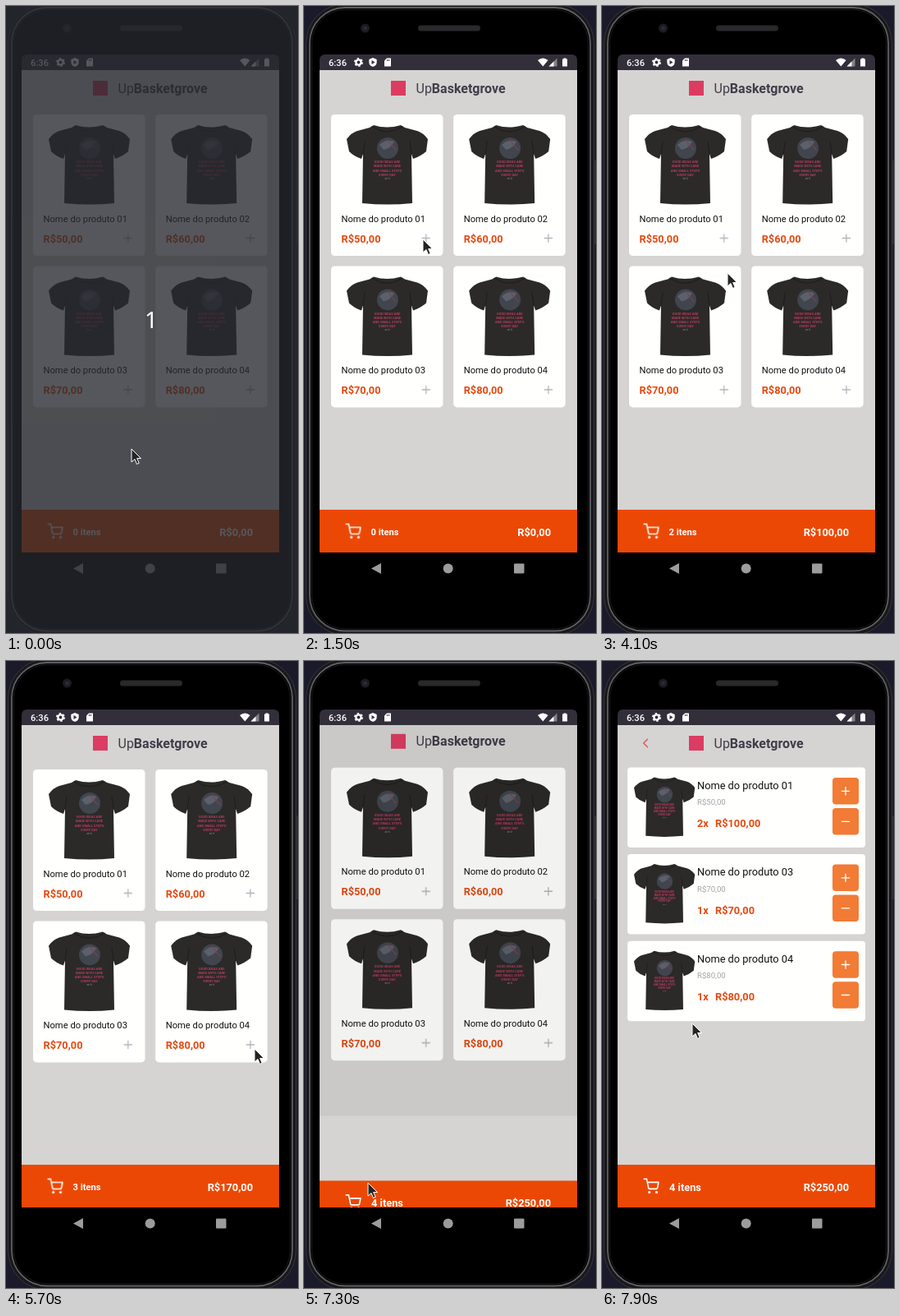
Animation, 356 px wide and 763 px high, one loop 8 s. Source, as an HTML page:

```html
<!DOCTYPE html>
<html lang="pt-BR">
<head>
<meta charset="utf-8">
<title>Loja</title>
<style>
@property --p { syntax: "<number>"; inherits: true; initial-value: 0; }

html, body { margin: 0; width: 100%; height: 100%; overflow: hidden; background: #1b1a2a; }
#stage { display: block; width: 356px; height: 763px; font-family: Roboto, sans-serif; }
text { white-space: pre; }
.b { font-weight: 700; }
.end { text-anchor: end; }
.mid { text-anchor: middle; }
.s10 { font-size: 9.6px; }
.s11 { font-size: 11.2px; }
.s13 { font-size: 12.8px; }
.price { fill: #e6490f; }
.line { fill: none; stroke-linecap: round; stroke-linejoin: round; }

/* every part shares one clock and changes in hard steps */
.anim { animation: 8s step-end -10ms infinite; }
#countdown { animation-name: countdown; }
#cursor { animation-name: cursor; }
#screen { animation-name: reveal; }
#label { animation-name: press; }
.reel { animation-name: reel; }
.tap1 { animation-name: tap1; }
.tap3 { animation-name: tap3; }
.tap4 { animation-name: tap4; }

#shop { transform: translateY(calc(var(--p) * -11.74px)); }
#shade { opacity: calc(min(var(--p) / .36, 1) * .1); }
#sheet { transform: translateY(calc((1 - var(--p)) * 587px)); }
#cart { transform: translateY(calc((1 - var(--p)) * -563px)); }

@keyframes countdown { 0% { opacity: 1 } 1.25%, to { opacity: 0 } }
@keyframes reveal {
  0% { --p: 0 } 91.25% { --p: .19 } 92.5% { --p: .784 } 93.75% { --p: .945 }
  95% { --p: .99 } 96.25%, to { --p: 1 }
}
@keyframes reel {
  0% { transform: none } 25% { transform: translateY(-24px) }
  47.5% { transform: translateY(-48px) } 62.5% { transform: translateY(-72px) }
  77.5%, to { transform: translateY(-96px) }
}
@keyframes press { 0% { opacity: 1 } 87.5% { opacity: .2 } 91.25%, to { opacity: 1 } }
@keyframes tap1 {
  0% { opacity: 1 } 22.5% { opacity: .5 } 23.75% { opacity: .2 } 26.25% { opacity: .6 }
  27.5% { opacity: 1 } 45% { opacity: .2 } 47.5% { opacity: .6 } 48.75%, to { opacity: 1 }
}
@keyframes tap3 { 0% { opacity: 1 } 60% { opacity: .2 } 63.75% { opacity: .6 } 65%, to { opacity: 1 } }
@keyframes tap4 { 0% { opacity: 1 } 76.25% { opacity: .2 } 77.5% { opacity: .6 } 80%, to { opacity: 1 } }
@keyframes cursor {
  0% { transform: translate(153px, 539px) }
  6.25% { transform: translate(150px, 525px) }
  7.5% { transform: translate(140px, 440px) }
  8.75% { transform: translate(126px, 300px) }
  10% { transform: translate(123px, 220px) }
  11.25% { transform: translate(190px, 198px) }
  12.5% { transform: translate(270px, 205px) }
  13.75% { transform: translate(295px, 225px) }
  15% { transform: translate(230px, 262px) }
  16.25% { transform: translate(143px, 289px) }
  17.5% { transform: translate(140px, 288px) }
  18.75% { transform: translate(145px, 284px) }
  32.5% { transform: translate(146px, 281px) }
  33.75% { transform: translate(146px, 284px) }
  35% { transform: translate(147px, 287px) }
  36.25% { transform: translate(148px, 285px) }
  51.25% { transform: translate(153px, 325px) }
  52.5% { transform: translate(156px, 370px) }
  53.75% { transform: translate(157px, 405px) }
  55% { transform: translate(158px, 426px) }
  57.5% { transform: translate(144px, 467px) }
  66.25% { transform: translate(200px, 468px) }
  67.5% { transform: translate(265px, 467px) }
  70% { transform: translate(285px, 470px) }
  71.25% { transform: translate(303px, 472px) }
  72.5% { transform: translate(301px, 472px) }
  73.75% { transform: translate(300px, 471px) }
  77.5% { transform: translate(291px, 470px) }
  80% { transform: translate(260px, 495px) }
  81.25% { transform: translate(190px, 550px) }
  82.5% { transform: translate(120px, 605px) }
  83.75% { transform: translate(85px, 630px) }
  85% { transform: translate(78px, 635px) }
  92.5% { transform: translate(107px, 606px) }
  93.75% { transform: translate(108px, 560px) }
  95% { transform: translate(109px, 510px) }
  96.25% { transform: translate(109px, 470px) }
  97.5% { transform: translate(110px, 448px) }
  98.75%, to { transform: translate(110px, 441px) }
}
</style>
</head>
<body>
<svg id="stage" viewBox="0 0 356 763" xmlns="http://www.w3.org/2000/svg">
  <defs>
    <g id="tee">
      <path fill="#2b2a29" d="M33 0Q49 5 66 0L71 3 86 7Q93 9 99 17L97 32Q90 38 81 41L79 35 80 95Q50 98 19 95L20 35 18 41Q9 38 3 32L0 17Q6 9 13 7L28 3Z"/>
      <path class="line" stroke="#1d1c1c" d="M31 2Q49 14 68 2M20 35L22 20M79 35L77 20"/>
      <circle cx="50" cy="28" r="13" fill="#41454e"/>
      <path fill="#5c606a" d="M40 24Q48 16 58 20Q54 28 45 30Z"/>
      <path class="line" stroke="#7e4250" stroke-width="1.2" d="M50 18Q54 24 60 30"/>
      <g class="mid b" font-size="4" fill="#b93a5d">
        <text x="49.5" y="46.2">GOOD IDEAS ARE</text>
        <text x="49.5" y="51.4">MADE WITH CARE</text>
        <text x="49.5" y="56.6">AND SMALL STEPS</text>
        <text x="49.5" y="61.8">EVERY DAY</text>
        <text x="49.5" y="66" font-size="3" fill="#77777b">on it</text>
      </g>
    </g>
    <path id="plus" class="line" stroke-width="1.3" d="M-4.7 0H4.7M0-4.7V4.7"/>
    <path id="minus" class="line" stroke-width="1.3" d="M-4.7 0H4.7"/>
    <g id="trolley" class="line" stroke="#fff" stroke-width="2" transform="translate(50.5 629.6) scale(.8)">
      <circle cx="9" cy="21" r="1"/><circle cx="20" cy="21" r="1"/>
      <path d="M1 1h4l2.68 13.39a2 2 0 0 0 2 1.61h9.72a2 2 0 0 0 2-1.61L23 6H6"/>
    </g>
    <g id="header">
      <rect x="106" y="91" width="18" height="18" fill="#dc3c62"/>
      <text x="136.5" y="105.7" font-size="16" fill="#3f3d49">Up<tspan class="b">Basketgrove</tspan></text>
    </g>
  </defs>

  <!-- phone body -->
  <rect width="356" height="763" fill="#1b1a2a"/>
  <rect x="353" y="188" width="3" height="102" fill="#2c2c32"/>
  <rect x="2.5" y="-2.5" width="351" height="768" rx="48" fill="#18181a" stroke="#37373c"/>
  <rect x="7" y="2" width="342" height="758.5" rx="43" fill="#000" stroke="#5f5f65" stroke-width="1.8"/>
  <rect x="9.5" y="4.5" width="337" height="753.5" rx="40.5" fill="none" stroke="#1d1d20"/>
  <circle cx="74.5" cy="27" r="5.5" fill="#1b1b20"/>
  <circle cx="74.5" cy="27" r="2.5" fill="#2b2b36"/>
  <rect x="139" y="23.5" width="76" height="7" rx="3.5" fill="#29292b"/>

  <!-- status bar -->
  <path fill="#332f3a" d="M19 78V66q0-7 7-7H326q7 0 7 7V78Z"/>
  <g fill="#fff">
    <text class="s11" x="30" y="72.5" font-weight="500">6:36</text>
    <circle cx="66.5" cy="68.5" r="3.1" fill="none" stroke="#fff" stroke-width="2.4"/>
    <circle cx="66.5" cy="68.5" r="4.7" fill="none" stroke="#fff" stroke-width="1.6" stroke-dasharray="2.46"/>
    <path d="M84 63l4.7 2v3.5q0 4-4.7 5.500q-4.7-1.5-4.7-5.500V65Z"/>
    <path fill="#332f3a" d="M82.5 66l4 2.5-4 2.5Z"/>
    <path d="M101 63.5h5v10h-8v-7Z"/>
    <path stroke="#332f3a" d="M101.5 65v2M103.5 65v2"/>
    <path d="M285 66q6.3-5 12.6 0L291.3 73.5Z"/>
    <path opacity=".4" d="M308.5 63.5v10h-10Z"/>
    <path d="M304.5 67.5v6h-6Z"/>
    <path d="M316.5 63.5h3v1h1.500v9h-6v-9h1.500Z"/>
  </g>

  <!-- app -->
  <svg x="19" y="78" width="314" height="587" viewBox="19 78 314 587">
    <g id="screen" class="anim">
      <g id="shop">
        <rect x="19" y="78" width="314" height="587" fill="#d5d4d2"/>
        <use href="#header"/>
        <g id="products"></g>
        <rect x="19" y="613" width="314" height="60" fill="#ec4805"/>
        <g id="label" class="anim">
          <use href="#trolley"/>
          <svg x="80" y="628" width="42" height="24"><g id="counts" class="reel anim s11 b" fill="#fff"></g></svg>
        </g>
        <svg x="230" y="628" width="74" height="24"><g id="totals" class="reel anim s13 b end" fill="#fff"></g></svg>
      </g>
      <rect id="shade" x="19" y="78" width="314" height="587"/>
      <g id="sheet">
        <svg x="19" y="78" width="314" height="587" viewBox="19 78 314 587">
          <g id="cart">
            <rect x="19" y="78" width="314" height="587" fill="#d5d4d2"/>
            <use href="#header"/>
            <path class="line" stroke="#d9625f" stroke-width="1.6" d="M55.5 95.2L50.7 100l4.8 4.8"/>
            <g id="lines"></g>
            <rect x="19" y="613" width="314" height="52" fill="#ec4805"/>
            <use href="#trolley"/>
            <g class="s13 b" fill="#fff">
              <text x="82" y="644.5">4 itens</text>
              <text class="end" x="301" y="644.5">R$250,00</text>
            </g>
          </g>
        </svg>
      </g>
    </g>
  </svg>

  <!-- navigation keys -->
  <g fill="#9c9c9c">
    <path d="M82 684.5L94 678v13Z"/>
    <circle cx="175.7" cy="684.5" r="6"/>
    <rect x="256" y="678.5" width="12.5" height="12" rx="1"/>
  </g>

  <g id="countdown" class="anim">
    <rect width="356" height="763" fill="#26282f" fill-opacity=".78"/>
    <text class="mid" x="177" y="392" font-size="28" fill="#fff" style="font-family:'Noto Sans',sans-serif">1</text>
  </g>
  <path id="cursor" class="anim" fill="#252525" stroke="#fff" d="M0 0V16L4 12.5 6.5 18.5 9.2 17.3 6.7 11.5H11.5Z"/>
</svg>

<script>
const fill = (id, parts) => { document.getElementById(id).innerHTML = parts.join(''); };
const money = n => `R$${n},00`;

const product = i => `
  <g transform="translate(${i % 2 * 149.2} ${(i >> 1) * 184.4})">
    <rect x="33" y="132" width="136.5" height="172" rx="4.5" fill="#fffffe"/>
    <use href="#tee" x="52" y="145"/>
    <text class="s11" x="45.5" y="262.5" fill="#111">Nome do produto 0${i + 1}</text>
    <text class="s13 b price" x="45.5" y="287.5">${money(50 + 10 * i)}</text>
    <use href="#plus" class="anim tap${i + 1}" x="148.7" y="282.5" stroke="#b4b4ba"/>
  </g>`;

const button = (y, icon) => `
  <rect x="281" y="${y}" width="32" height="32.5" rx="4" fill="#f27b35"/>
  <use href="#${icon}" x="297" y="${y + 16.3}" stroke="#fff"/>`;

const cartLine = ([id, qty, cost], i) => `
  <g transform="translate(0 ${i * 105.6})">
    <rect x="31" y="129.5" width="290" height="97.5" rx="4" fill="#fffffe"/>
    <use href="#tee" transform="translate(39 141.5) scale(.75)"/>
    <text class="s13" x="116" y="155.5" fill="#111">Nome do produto 0${id}</text>
    <text class="s10" x="116" y="175.3" fill="#a3a3a8">${money(cost)}</text>
    <text class="s13 b price" x="116" y="202">${qty}x</text>
    <text class="s13 b price" x="138" y="202">${money(qty * cost)}</text>
    ${button(142, 'plus')}${button(179, 'minus')}
  </g>`;

fill('products', [0, 1, 2, 3].map(product));
fill('lines', [[1, 2, 50], [3, 1, 70], [4, 1, 80]].map(cartLine));

const totals = [0, 50, 100, 170, 250];
fill('counts', totals.map((_, i) => `<text x="1.5" y="${15.5 + 24 * i}">${i} itens</text>`));
fill('totals', totals.map((n, i) => `<text x="71" y="${16.5 + 24 * i}">${money(n)}</text>`));
</script>
</body>
</html>
```
